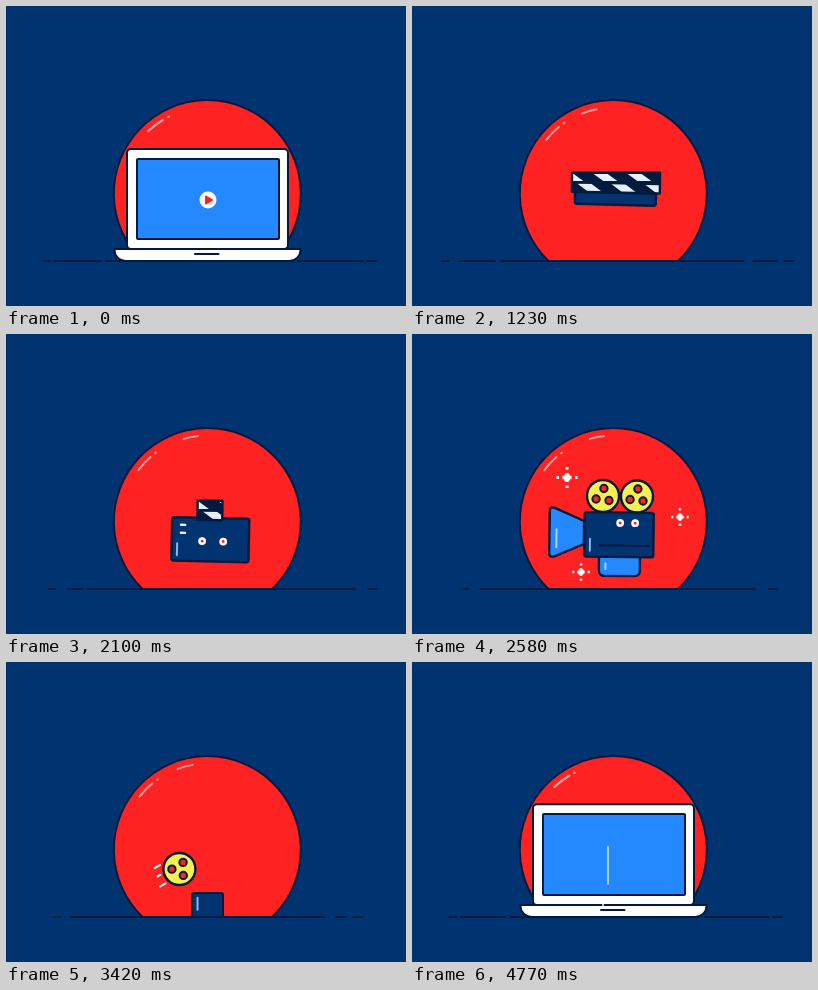
These frames come from a looping animation (400 by 300 pixels, 4800 ms). An HTML page with a canvas:

```html
<!DOCTYPE html>
<html lang="en">
<head>
<meta charset="utf-8">
<title>Film story loop</title>
<style>
html, body { margin: 0; width: 100%; height: 100%; overflow: hidden; background: #003370; }
canvas { display: block; width: 400px; height: 300px; }
</style>
</head>
<body>
<canvas id="stage" width="400" height="300"></canvas>
<script>
const ctx = document.getElementById('stage').getContext('2d');
const LOOP = 4800, FLOOR = 255, MID = 202;
const INK = '#021a3e', NAVY = '#003370', RED = '#ff2222', BLUE = '#2488ff';
const YELLOW = '#f7ef50', WHITE = '#ffffff', PALE = '#e6efff', GLEAM = '#a8d0ff';
const BOLD = 2.4;

const lerp = (a, b, k) => a + (b - a) * k;
const clamp = k => Math.max(0, Math.min(1, k));
const ramp = (t, a, b) => clamp((t - a) / (b - a));
const ease = (t, a, b) => { const k = ramp(t, a, b); return k * k * (3 - 2 * k); };
const pop = (t, a, b) => { const k = ramp(t, a, b) - 1; return 1 + 2.2 * k * k * k + 1.2 * k * k; };

// Endless swing from one value at t0 to the other at t1 and back
function swing(t, from, to, t0, t1) {
  const k = (t - t0 + LOOP) % LOOP, out = t1 - t0;
  return k < out ? lerp(from, to, k / out) : lerp(to, from, ((k - out) / (LOOP - out)) ** 1.2);
}

function paint(path, fill, width = 2, stroke = INK) {
  if (fill) { ctx.fillStyle = fill; ctx.fill(path); }
  if (width) { ctx.strokeStyle = stroke; ctx.lineWidth = width; ctx.lineJoin = 'round'; ctx.stroke(path); }
}
function rect(x, y, w, h, r = 0) {
  const p = new Path2D();
  p.roundRect(x, y, Math.max(0, w), Math.max(0, h), r);
  return p;
}
function arc(x, y, r, from = 0, to = Math.PI * 2) {
  const p = new Path2D();
  p.arc(x, y, Math.max(0, r), from, to);
  return p;
}
function poly(points, closed = true) {
  const p = new Path2D();
  points.forEach(([x, y]) => p.lineTo(x, y));
  if (closed) p.closePath();
  return p;
}
// Closed outline from one half, reflected across the horizontal axis
const mirrored = half => poly([...half, ...half.map(([x, y]) => [x, -y]).reverse()]);

function line(x1, y1, x2, y2, color = INK, width = 2, cap = 'round') {
  ctx.lineCap = cap;
  paint(poly([[x1, y1], [x2, y2]], false), null, width, color);
}
function group(draw, x = 0, y = 0, scale = 1, angle = 0) {
  if (scale <= 0) return;
  ctx.save();
  ctx.translate(x, y);
  ctx.rotate(angle);
  ctx.scale(scale, scale);
  draw();
  ctx.restore();
}

function ball(t) {
  const x = 201.3, y = 187.6, r = 93.5;
  const half = Math.asin((FLOOR - y) / r);
  paint(arc(x, y, r, Math.PI - half, half), RED);
  const k = 1 - Math.abs(2 * t / LOOP - 1) ** 2.2;
  const shine = (degrees, length) => {
    const start = Math.PI * (1 + degrees / 180);
    ctx.lineCap = 'round';
    paint(arc(x, y, 86, start, start + Math.PI * length / 180), null, 2, '#ff9c9c');
  };
  const first = 47 - 10.4 * k;
  shine(first, 12);
  shine(first + 16, 0.6);
  shine(46.5 + 27.7 * k, 12.4 - 2.6 * k);
}

function ground(t) {
  const dash = (from, to) => { if (to > from) line(from, FLOOR, to, FLOOR, INK, 2, 'butt'); };
  const left = swing(t, 27, 51, 1050, 2750), right = swing(t, 384, 357, 1050, 3400);
  const wave = Math.sin(Math.PI * t / LOOP);
  const a = left + 11 + 8 * wave, b = right - 13.5 - 9 * wave ** 4;
  const midL = 48 * (1 - ramp(t, 0, 2580) ** 2 + ramp(t, 4200, LOOP));
  const midR = 66 * (1 - ramp(t, 0, 1680) ** 1.5 + ramp(t, 2800, LOOP) ** 1.5);
  dash(left, left + 8);
  dash(a, a + midL);
  dash(a + midL + Math.min(4.5, midL), b - midR - Math.min(9, midR));
  dash(b - midR, b);
  dash(right - 10.5, right);
}

function laptopBase() {
  paint(rect(108.5, 243, 186, 12, [0, 0, 11, 11]), WHITE);
  line(189, 248, 212.5, 248);
}

function laptop(t, lidTop) {
  const { close, front, depth } = lidTop;
  const tilt = clamp(close / 0.635), side = 3 * tilt;
  const inset = 10 * (1 - close) ** 1.6;
  group(() => {
    paint(rect(121 - side, front, 161 + side * 2, 243 - front, 4 * (1 - tilt)), WHITE);
    if (depth > 0.5) paint(rect(120, front - depth, 164, depth, [7 * tilt, 7 * tilt, 0, 0]), WHITE);
    if (close < 0.97) paint(rect(131 - side, front + inset, 142 + side * 2, 243 - front - inset * 2, 1), BLUE);
    laptopBase();
    group(() => {
      paint(arc(0, 0, 8.5), WHITE, 0);
      paint(poly([[-2, -3.5], [4, 0], [-2, 3.5]]), RED, 2, RED);
    }, MID, 194, 1 - ease(t, 530, 640));
  }, 0, 30 * ease(t, 1040, 1200));
}

function lidAt(t) {
  const close = ease(t, 616, 1046);
  return { close, front: lerp(143, 243, close), depth: 7.5 * clamp(close / 0.635) };
}

function cursor(t, lid) {
  const press = 0.15 * Math.sin(Math.PI * ramp(t, 430, 540));
  const size = t > 160 ? pop(t, 160, 330) * (1 - ease(t, 1000, 1100)) * (1 - press) : 0;
  const reach = ease(t, 250, 440);
  const y = lerp(lerp(213, 195, reach), lid.front - lid.depth + 0.3, ease(t, 520, 650));
  group(() => paint(mirrored([[0, 0], [23, 12], [22, 3.3], [42.5, 3.3]]), WHITE),
    lerp(225, 203.7, reach), y, size, Math.PI / 4.1);
}

function slat(w, h, offset, dark) {
  const body = rect(0, 0, w, h);
  paint(body, PALE, 0);
  ctx.save();
  ctx.globalAlpha = dark;
  paint(body, INK, 0);
  ctx.clip(body);
  for (let x = offset; x < w; x += 34)
    paint(poly([[x, 0], [x + 14, 0], [x + 27, h], [x + 13, h]]), PALE, 0);
  ctx.restore();
  paint(body, null, lerp(2, BOLD, dark));
}

function clapperSlats(t) {
  if (t < 640 || t > 2150) return;
  const grow = ease(t, 930, 1200), shrink = ease(t, 2010, 2150);
  const w = lerp(18, 88, grow) * (1 - shrink);
  const x = lerp(192, 160, grow) + 44 * shrink, y = lerp(188.5, 176.3, grow);
  const open = ease(t, 1250, 1640) - ease(t, 1780, 1930);
  group(() => slat(w, 9.5, 4, grow), x, y, 1, 0.02 * grow);
  group(() => {
    ctx.translate(0, -9.5);
    slat(w, 9.5, -14, grow);
  }, x, y - 1.2 * open, 1, -0.43 * open);
}

function eye(x, y, r) {
  paint(arc(x, y, r), WHITE, 0);
  paint(arc(x, y, r * 0.38), RED, 0);
}

// One box becomes clapperboard, camera, pedestal and laptop base
function crate(t) {
  if (t < 1150 || t > 4690) return;
  const film = ease(t, 2010, 2250), stand = ease(t, 3000, 3330), base = ease(t, 4320, 4670);
  const morph = (clap, camera, pedestal, laptop) =>
    lerp(lerp(lerp(clap, camera, film), pedestal, stand), laptop, base);
  const x = morph(162.5, 172.5, 186, 108.5), y = morph(186.5, 178.5, 231, 243);
  const w = morph(81, 69, 31, 186), h = morph(43, 44.5, 24, 12);
  const shown = h * ease(t, 1150, 1380), round = 2 + 9 * base;
  group(() => {
    ctx.translate(-w / 2, -h / 2);
    const body = rect(0, 0, w, shown, [2, 2, round, round]);
    paint(body, NAVY, 0);
    ctx.globalAlpha = base;
    paint(body, WHITE, 0);
    ctx.globalAlpha = 1;
    paint(body, null, lerp(BOLD, 2, stand));
    if (shown < h * 0.98) return;

    const shineY = h * lerp(0.6, 0.2, stand);
    line(5.5, shineY, 5.5, shineY + 12 * (1 - base), '#8fb4e8');
    const text = ease(t, 1380, 1520) - ease(t, 2000, 2120);
    if (text > 0) for (const row of [7.5, 15.5]) line(9, row, 9 + 62 * text, row, PALE, BOLD);
    const slot = ease(t, 2170, 2330) - ease(t, 2980, 3080);
    if (slot > 0) line(15, 33, 15 + 49 * slot, 33);
    const look = pop(t, 1400, 1550) - ease(t, 2980, 3120);
    for (const side of [-1, 1])
      eye(lerp(40, 43, film) + side * lerp(12, 7.5, film), lerp(29.5, 10.5, film), 3.9 * clamp(look));
  }, x + w / 2, y + h / 2, 1, 0.026 * (1 - film / 2) * (1 - stand));
}

function reel(r, turn, holes = 1) {
  paint(arc(0, 0, r), YELLOW, BOLD);
  for (let i = 0; holes > 0 && i < 3; i++) {
    const a = turn + i * Math.PI * 2 / 3;
    paint(arc(r * 0.47 * Math.cos(a), r * 0.47 * Math.sin(a), r * 0.23 * holes), RED);
  }
}

const cameraSize = t => t < 2140 ? 0 : pop(t, 2140, 2430) * (1 - ease(t, 2990, 3150));

function cameraParts(t) {
  const size = cameraSize(t);
  group(() => {
    paint(mirrored([[0, 11.5], [-30, 24.5], [-33, 24.5], [-34.5, 22.5]]), BLUE, BOLD);
    line(-27.5, -3, -27.5, 15, GLEAM);
  }, 172, 198.5, size, 0.013);
  group(() => {
    paint(rect(-20.5, 0, 41, 19.5, [0, 0, 5, 5]), BLUE, BOLD);
    line(-14, 7, -14, 13, GLEAM);
  }, 207.5, 222.5, size, 0.01);
  group(() => reel(16, -1.45), 225, 162.5, size);
}

// The left reel drops, leaps onto the pedestal and turns into a head
function hero(t) {
  if (t < 2140 || t > 4560) return;
  const fall = ramp(t, 3020, 3240), leap = ramp(t, 3240, 3800) ** 1.6, sink = ease(t, 4330, 4520);
  const x = 191 - 23 * fall + 33 * leap;
  const y = 162 + 56 * fall * fall - 67 * leap + 34 * sink;
  const size = pop(t, 2140, 2430) * (1 - ease(t, 4430, 4560));
  group(() => {
    reel(lerp(16, 10.3, ease(t, 3500, 3780)), -1.45 + 0.0114 * Math.max(0, t - 3020), 1 - ease(t, 3560, 3760));
    if (t > 3800) line(-5, -3, -3, -5.5, '#fffbd0', 1.6);
  }, x, y, size);
  group(() => {
    for (let i = 0; i < 3; i++) {
      const a = 0.5 * i - 0.2, length = 6 - 3 * (i % 2);
      const ex = -20 * Math.cos(a), ey = 20 * Math.sin(a);
      line(ex - 0.87 * length, ey + 0.5 * length, ex, ey, WHITE);
    }
  }, x, y, ease(t, 3260, 3340) - ease(t, 3520, 3620));
}

function sparkle(x, y, size) {
  group(() => {
    for (let i = 0; i < 4; i++) {
      ctx.rotate(Math.PI / 2);
      line(0, 0, 4.5, 0, WHITE, 3.4, 'butt');
      line(8, 0, 10.5, 0, WHITE, 3, 'butt');
    }
    paint(rect(-3, -3, 6, 6), WHITE, 0);
  }, x, y, size);
}
function sparkles(t) {
  const size = ease(t, 2350, 2530) - ease(t, 2810, 2960);
  sparkle(155, 143.5, size);
  sparkle(268, 183, size * 0.83);
  sparkle(169, 238, size * 0.83);
}

function sidekick(x, dy) {
  group(() => {
    paint(rect(-13, 245, 26, 10, 2), NAVY);
    paint(rect(-6.5, 200, 13, 45), BLUE);
    paint(rect(-14.5, 187, 29, 35, [7, 7, 3, 3]), BLUE);
    paint(rect(-6.5, 210, 13, 34), BLUE, 0);
    for (const side of [-7, 7]) line(side, 197, side, 244);
    line(0, 218, 0, 244);
    paint(arc(-0.5, 175, 8), BLUE);
    line(-4, 173, -2, 171, GLEAM, 1.6);
  }, x, dy);
}

function winner(t) {
  if (t < 3600 || t > 4400) return;
  const arms = pop(t, 3760, 3980) * (1 - ease(t, 4270, 4400));
  const arm = [[12, 165], [27, 159], [22.5, 141], [31, 139], [37, 163], [12, 178]]
    .map(([x, y]) => [lerp(12, x, arms), lerp(171, y, arms)]);
  const half = [[12, 165], ...arm, [12, 231]];
  group(() => {
    paint(poly([...half.map(([x, y]) => [MID + x, y]), ...half.map(([x, y]) => [MID - x, y]).reverse()]), YELLOW);
    line(196, 185, 196, 222, '#fffbb0');
  }, 0, 92 * (1 - ease(t, 3600, 3820)));
}

function newLaptop(t) {
  if (t < 4380) return;
  const k = ease(t, 4380, 4690), screen = ease(t, 4470, 4720);
  const w = lerp(24, 161, k), top = lerp(165, 142.3, k), bottom = lerp(231, 243, k);
  const lid = rect(lerp(MID, 201.5, k) - w / 2, top, w, bottom - top, 4 * k);
  paint(lid, YELLOW, 0);
  ctx.globalAlpha = ease(t, 4400, 4600);
  paint(lid, WHITE, 0);
  ctx.globalAlpha = 1;
  paint(lid, null);
  if (screen > 0) paint(rect(MID - 71 * screen, 192.5 - 40.5 * screen, 142 * screen, 81 * screen, 1), BLUE);
  line(196, 185, 196, 222, GLEAM);
}

function render(t) {
  ctx.fillStyle = NAVY;
  ctx.fillRect(0, 0, 400, 300);
  ball(t);
  ground(t);
  ctx.save();
  ctx.beginPath();
  ctx.rect(0, 0, 400, FLOOR + 1);
  ctx.clip();
  if (t < 1200) {
    const lid = lidAt(t);
    clapperSlats(t);
    laptop(t, lid);
    cursor(t, lid);
  }
  cameraParts(t);
  const hidden = 1 - pop(t, 3720, 4000) + ease(t, 4260, 4480);
  if (t > 3720 && hidden < 1) for (const side of [-1, 1]) sidekick(201 + side * 44.5, 92 * hidden);
  winner(t);
  hero(t);
  newLaptop(t);
  crate(t);
  if (t >= 1200) clapperSlats(t);
  if (t > 4690) {
    laptopBase();
    line(191, 242.5, 191, 243.5, WHITE, 1.5);
  }
  sparkles(t);
  ctx.restore();
}

function tick() {
  render(performance.now() % LOOP);
  requestAnimationFrame(tick);
}
tick();
</script>
</body>
</html>
```
